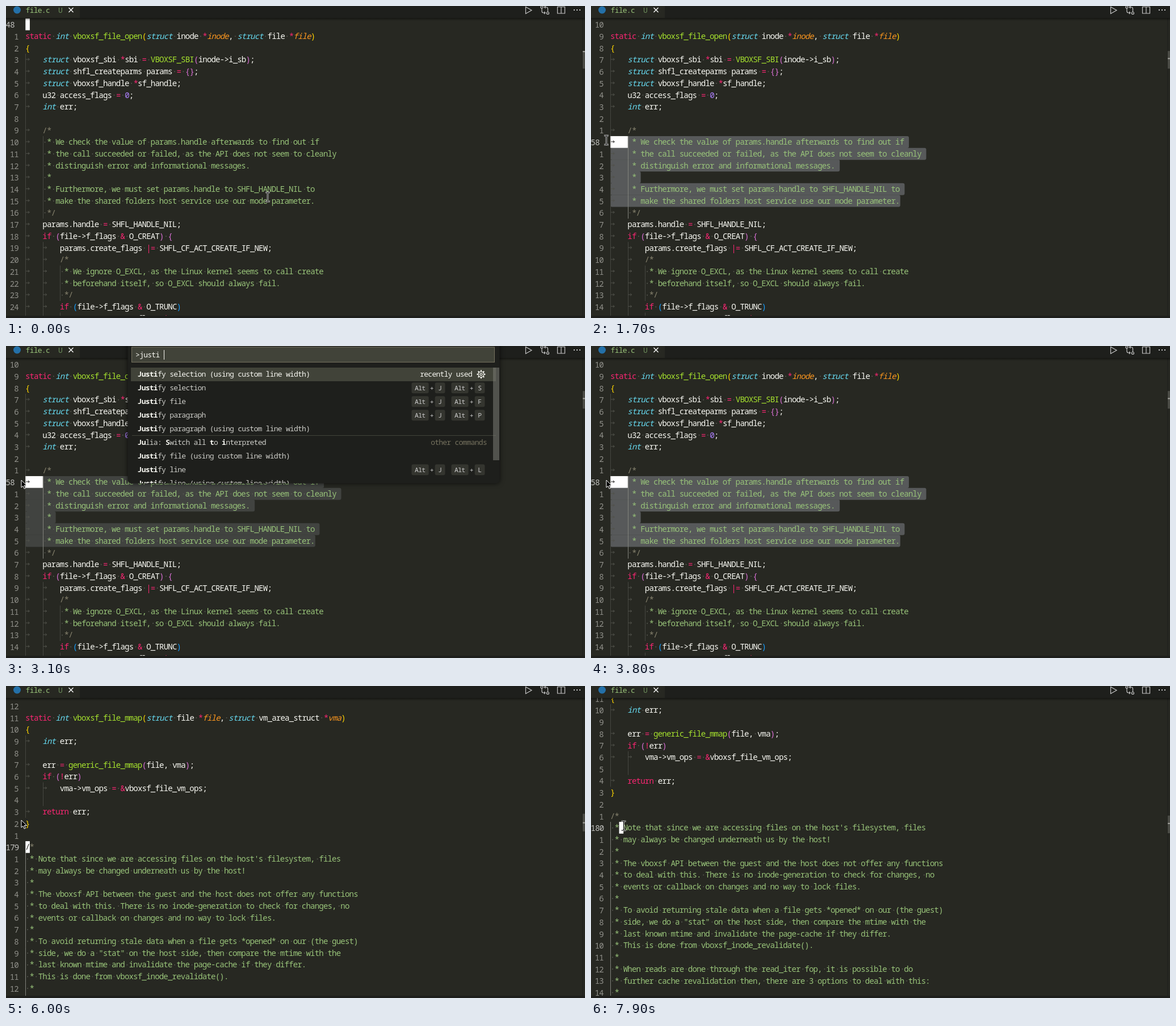
These frames come from a looping animation (1020x549 px, 8000 ms). An HTML page with a canvas:

```html
<!DOCTYPE html>
<html>
<head>
<meta charset="utf-8">
<style>
html, body { margin: 0; height: 100%; overflow: hidden; background: #272822; }
canvas { display: block; }
</style>
</head>
<body>
<canvas id="stage" width="1020" height="549"></canvas>
<script>
const ctx = document.getElementById('stage').getContext('2d');
const LOOP = 8000, LEFT = 34.3, CW = 7.62, LH = 20.7;
const FG = '#f8f8f2', BG = '#272822', DARK = '#1e1f1c', PINK = '#f92672',
  GREEN = '#98c379', GREY = '#88846f', FAINT = '#51524b';

const openDoc = `
static int vboxsf_file_open(struct inode *inode, struct file *file)
{
\tstruct vboxsf_sbi *sbi = VBOXSF_SBI(inode->i_sb);
\tstruct shfl_createparms params = {};
\tstruct vboxsf_handle *sf_handle;
\tu32 access_flags = 0;
\tint err;

\t/*
\t * We check the value of params.handle afterwards to find out if
\t * the call succeeded or failed, as the API does not seem to cleanly
\t * distinguish error and informational messages.
\t *
\t * Furthermore, we must set params.handle to SHFL_HANDLE_NIL to
\t * make the shared folders host service use our mode parameter.
\t */
\tparams.handle = SHFL_HANDLE_NIL;
\tif (file->f_flags & O_CREAT) {
\t\tparams.create_flags |= SHFL_CF_ACT_CREATE_IF_NEW;
\t\t/*
\t\t * We ignore O_EXCL, as the Linux kernel seems to call create
\t\t * beforehand itself, so O_EXCL should always fail.
\t\t */
\t\tif (file->f_flags & O_TRUNC)
\t\t\tparams.create_flags |= SHFL_CF_ACT_OVERWRITE_IF_EXISTS;`.split('\n');

const justifiedDoc = openDoc.slice();
justifiedDoc.splice(10, 6, ...`\t * We check the value of params.handle afterwards  to  find  out  if  the  call
\t * succeeded or failed, as the API does not seem to cleanly  distinguish  error
\t * and informational messages.
\t *
\t * Furthermore, we must set params.handle to SHFL_HANDLE_NIL to make the shared
\t * folders host service use our mode parameter.`.split('\n'));

const mmapDoc = `
static int vboxsf_file_mmap(struct file *file, struct vm_area_struct *vma)
{
\tint err;

\terr = generic_file_mmap(file, vma);
\tif (!err)
\t\tvma->vm_ops = &vboxsf_file_vm_ops;

\treturn err;
}

/*
 * Note that since we are accessing files on the host's filesystem, files
 * may always be changed underneath us by the host!
 *
 * The vboxsf API between the guest and the host does not offer any functions
 * to deal with this. There is no inode-generation to check for changes, no
 * events or callback on changes and no way to lock files.
 *
 * To avoid returning stale data when a file gets *opened* on our (the guest)
 * side, we do a "stat" on the host side, then compare the mtime with the
 * last known mtime and invalidate the page-cache if they differ.
 * This is done from vboxsf_inode_revalidate().
 *
 * When reads are done through the read_iter fop, it is possible to do
 * further cache revalidation then, there are 3 options to deal with this:
 *`.split('\n');

// Palette entries: [label with *bold* parts, key chords]
const recent = [
  ['Justify selection (using custom line width)'],
  ['View: Toggle Status Bar Visibility'],
  ['Justify selection', 'Alt J Alt S'],
  ['Debug: JavaScript Debug Terminal'],
  ['Git: Commit'],
  ['Reload Custom CSS and JS'],
  ['Easy Terminal: Decrease Font Size', 'Ctrl Shift -'],
  ['View: Toggle Word Wrap', 'Alt Z'],
  ['View: Toggle Breadcrumbs']];
const matches = [
  ['*Justi*fy selection (using custom line width)'],
  ['*Justi*fy selection', 'Alt J Alt S'],
  ['*Justi*fy file', 'Alt J Alt F'],
  ['*Justi*fy paragraph', 'Alt J Alt P'],
  ['*Justi*fy paragraph (using custom line width)'],
  ['*Ju*lia: *S*witch all *t*o *i*nterpreted'],
  ['*Justi*fy file (using custom line width)'],
  ['*Justi*fy line', 'Alt J Alt L'],
  ['*Justi*fy line (using custom line width)']];

// Mouse path: time, x, y
const path = [[0, 461, 336], [400, 545, 343], [900, 118, 263], [1400, 27, 236],
  [6200, 27, 236], [6800, 64, 240], [7100, 48, 238], [7200, 48, 238],
  [7300, 48, 246], [7800, 48, 246], [7900, 57.5, 246], [8000, 57.5, 246]];

const FAMILY = '"Noto Sans Mono", "DejaVu Sans Mono", monospace';
ctx.font = '100px ' + FAMILY;
const advance = ctx.measureText('M').width / 100;

// Tall, tightly tracked type on a fixed cell grid
function text(s, x, y, color, pitch = CW, style = '') {
  const size = pitch * 1.85, tracking = pitch - advance * size;
  ctx.font = `${style} ${size}px ${FAMILY}`;
  ctx.letterSpacing = tracking + 'px';
  ctx.fillStyle = color;
  ctx.fillText(s, x + tracking / 2, y + pitch * 0.66);
}
function rect(x, y, w, h, color) {
  ctx.fillStyle = color;
  ctx.fillRect(x, y, w, h);
}
function round(x, y, w, h, r, color) {
  ctx.fillStyle = color;
  ctx.beginPath();
  ctx.roundRect(x, y, w, h, r);
  ctx.fill();
}
function stroke(d, color, width = 1) {
  ctx.strokeStyle = color;
  ctx.lineWidth = width;
  ctx.stroke(new Path2D(d));
}
const colX = c => LEFT + c * CW;
const expand = s => s.replace(/\t/g, '    ');
const indent = s => expand(s).search(/\S/);

function mouseAt(t) {
  const i = path.findIndex(p => p[0] > t), [a, b] = [path[i - 1], path[i]];
  const k = (t - a[0]) / (b[0] - a[0]);
  return [a[1] + (b[1] - a[1]) * k, a[2] + (b[2] - a[2]) * k];
}

function guideCount(doc, i) {
  if (doc[i]) return Math.ceil(indent(doc[i]) / 4);
  const a = doc[i - 1] ? indent(doc[i - 1]) : 0, b = doc[i + 1] ? indent(doc[i + 1]) : 0;
  return a === b ? Math.ceil(a / 4) : 1 + Math.floor(Math.min(a, b) / 4);
}

const brackets = ['#ffd700', '#da70d6', '#179fff'];
let depth = 0;
function drawCode(line, y) {
  const full = expand(line), body = full.trimStart();
  let col = full.length - body.length;
  if (/^(\/\*|\*)/.test(body)) {
    text(body, colX(col), y, /^(\/\*|\*\/)$/.test(body) ? GREY : GREEN);
    return;
  }
  const tokens = body.match(/->|\w+|[*=&|!]+|./g) || [];
  tokens.forEach((tok, i) => {
    let color = FG, style = '';
    if (/^(struct|int)$/.test(tok)) { color = '#66d9ef'; style = 'italic'; }
    else if (/^(static|if|return|[*=&|!]+)$/.test(tok)) color = PINK;
    else if (/^\d+$/.test(tok)) color = '#ae81ff';
    else if (/[({]/.test(tok)) color = brackets[depth++ % 3];
    else if (/[)}]/.test(tok)) color = brackets[--depth % 3];
    else if (/^\w/.test(tok) && tokens[i + 1] === '(') color = '#a6e22e';
    else if (tokens[0] === 'static' && tokens[i - 1] === '*') { color = '#fd971f'; style = 'italic'; }
    text(tok, colX(col), y, color, CW, style);
    col += tok.length;
  });
}

function tabArrow(x, y, color) {
  stroke(`M${x + 1} ${y}h6m-2.5 -2l2.5 2l-2.5 2`, color);
}
function drawSpaces(line, y) {
  let col = 0;
  for (const ch of line) {
    if (ch === '\t') tabArrow(colX(col), y - 0.5, FAINT);
    if (ch === ' ') rect(colX(col) + 3, y - 0.5, 1.6, 1.6, '#5c5d56');
    col += ch === '\t' ? 4 : 1;
  }
}

function editor(t, mouse) {
  const late = t >= 6000, selecting = t >= 400 && t < 4500;
  const doc = late ? mmapDoc : t >= 4500 ? justifiedDoc : openDoc;
  const first = late ? 167 : 48;
  const scroll = late ? 54.7 * (1 - (1 - Math.min(1, (t - 6000) / 700)) ** 2) : 0;
  const top = (late ? 35 : 32.3) - scroll;
  const rowY = i => top + i * LH;

  let row = 0, col = 0;
  if (late) { row = t < 7500 ? 12 : 13; col = t < 7500 ? 0 : 2; }
  else if (t >= 4500) row = 10;
  else if (selecting) {
    row = Math.min(15, Math.max(10, Math.round((mouse[1] - top) / LH)));
    col = Math.round((mouse[0] + 15 - LEFT) / CW);
    if (col < 4) col = col < 2 ? 0 : 4;
    col = Math.min(col, expand(doc[row]).length);
  }

  ctx.save();
  ctx.beginPath();
  ctx.rect(0, 21, 1020, 524);
  ctx.clip();

  if (selecting) {
    const color = t >= 2200 && t < 3800 ? '#414340' : '#57595a';
    for (let i = row; i <= 15; i++) {
      const a = colX(i === row ? col : 0);
      const b = colX(expand(doc[i]).length + (i < 15 ? 1 : 0));
      if (b > a) round(a, rowY(i) - LH / 2, b - a, LH + 0.3, 3, color);
    }
  }

  depth = 0;
  doc.forEach((line, i) => {
    const y = rowY(i), n = Math.abs(i - row);
    for (let g = 0; g < guideCount(doc, i); g++) {
      const lit = late ? i > 12 : t >= 400 && g === 1 && i >= 10 && i <= 16;
      rect(Math.round(colX(g * 4)), y - LH / 2, 1, LH + 0.3, lit ? '#82837c' : '#464741');
    }
    drawSpaces(line, y);
    drawCode(line, y);
    if (n) text(String(n), 22.3 - String(n).length * CW, y + 0.8, '#90908a');
    else text(String(first + i), 0, y + 0.8, '#c2c2bf');
  });

  if (t >= 4500 && !late) {
    ctx.strokeStyle = '#888';
    ctx.lineWidth = 1;
    ctx.strokeRect(34.5, rowY(2) - 9.8, 7, 19.5);
  }

  const off = (t >= 5100 && t < 5500) || (t >= 6500 && t < 7000);
  if (!off) {
    const y = rowY(row), wide = selecting && col === 0;
    const c = selecting && !wide ? col + 1 : col;
    if (c !== col) rect(colX(col) - 1, y - LH / 2, 1.5, LH, '#fff');
    rect(colX(c), y - LH / 2, wide ? CW * 4 : CW, LH, '#fff');
    if (wide) tabArrow(colX(0), y - 0.5, '#222');
    else text(expand(doc[row])[c] || '', colX(c), y, BG);
  }

  // overview ruler
  const ruler = n => 21 + n * 1.225;
  rect(1015.5, 21, 1, 524, DARK);
  rect(1016, ruler(first - 0.5 + (32.3 - top) / LH), 4, 31, '#4b4c46');
  rect(1016, ruler(first + row - 0.5), 4, 2, '#a0a09a');

  const shade = ctx.createLinearGradient(0, 21, 0, 26);
  shade.addColorStop(0, 'rgba(0,0,0,.45)');
  shade.addColorStop(1, 'rgba(0,0,0,0)');
  rect(0, 21, 1020, 5, shade);
  ctx.restore();
}

function tabBar() {
  rect(130, 0, 890, 21, DARK);
  ctx.fillStyle = '#2470a8';
  ctx.beginPath();
  ctx.arc(19.5, 7, 6.5, 0, 7);
  ctx.fill();
  text('file.c', 35, 7, GREEN, 7.07);
  text('U', 92.5, 7, '#6a8a59', 7.07);
  stroke('M110.5 3l8 8m0 -8l-8 8', '#fff', 1.3);
  const icon = '#c5c5c5';
  stroke('M915.5 1.5v12l10.5 -6z', icon, 1.2);
  stroke('M971.5 1.5h13v11.5h-13zM978 1.5v11.5', icon, 1.2);
  stroke('M944 4v5q0 3 3 3h3m-2 -2l2 2l-2 2M954.5 10v-5q0 -3 -3 -3h-3m2 -2l-2 2l2 2', icon, 1.2);
  for (const [x, y] of [[944, 2], [954.5, 12.5]]) {
    ctx.beginPath();
    ctx.arc(x, y, 2, 0, 7);
    ctx.stroke();
  }
  for (const x of [1000, 1005, 1010]) rect(x, 6, 2, 2, icon);
}

function gear(x, y) {
  ctx.strokeStyle = FG;
  ctx.lineWidth = 1.2;
  for (const r of [2, 5]) {
    ctx.beginPath();
    ctx.arc(x, y, r, 0, 7);
    ctx.stroke();
  }
  for (let a = 0; a < 8; a++) {
    const c = Math.cos(a * Math.PI / 4), s = Math.sin(a * Math.PI / 4);
    stroke(`M${x + 5 * c} ${y + 5 * s}L${x + 7.5 * c} ${y + 7.5 * s}`, FG, 2);
  }
}

function keys(chord, right, y) {
  const list = chord.split(' ');
  for (let i = list.length - 1; i >= 0; i--) {
    const w = list[i].length * 6.2 + 11.6;
    right -= w;
    round(right, y - 9.5, w, 19, 3, '#34352f');
    text(list[i], right + 5.8, y, '#ccc', 6.2);
    const joined = list.length < 4 || i % 2;
    if (i && joined) text('+', right - 8.6, y, '#ccc', 6.2);
    right -= 11;
  }
}

function palette(t) {
  const typed = t >= 3100, focus = t >= 3300 ? 1 : 0;
  ctx.save();
  ctx.shadowColor = 'rgba(0,0,0,.7)';
  ctx.shadowBlur = 9;
  round(214.5, -8, 655, 249.5, 6, DARK);
  ctx.restore();

  ctx.save();
  ctx.beginPath();
  ctx.roundRect(214.5, -8, 655, 249.5, 6);
  ctx.clip();
  round(221, 1.5, 640, 27.5, 2, '#414339');
  ctx.strokeStyle = '#75715e';
  ctx.lineWidth = 1;
  ctx.strokeRect(221.5, 2, 639, 26.5);
  text(typed ? '>justi' : '>', 228.5, 15.5, FG, 7.07);
  rect(typed ? 278 : 235, 7, 1, 17, FG);

  rect(220, 38 + focus * 24, 643, 24, '#414339');
  (typed ? matches : recent).forEach(([label, chord], i) => {
    const y = 49.8 + i * 24, shift = i === focus ? 26 : 0;
    let x = 232;
    label.split('*').forEach((part, j) => {
      text(part, x, y, j % 2 || i === focus ? FG : '#ccccc7', 7.07, j % 2 ? 'bold' : '');
      x += part.length * 7.07;
    });
    if (chord) keys(chord, 843.5 - shift, y);
    if (shift) gear(837, y);
    const group = i === 0 ? 'recently used' : typed && i === 5 ? 'other commands' : '';
    text(group, 847.5 - shift - group.length * 7.07, y, shift ? FG : '#75715e', 7.07);
  });
  if (typed) {
    rect(222, 157, 641, 1, '#414339');
    rect(858, 38, 11, 163, 'rgba(125,125,118,.55)');
  }
  ctx.restore();
}

function pointer([x, y], arrow) {
  if (arrow) {
    const d = new Path2D(`M${x} ${y}v13l3 -2.7l2.2 4.9l2.2 -1l-2.2 -4.7h4.2z`);
    ctx.fillStyle = '#000';
    ctx.fill(d);
    ctx.strokeStyle = '#fff';
    ctx.lineWidth = 1;
    ctx.stroke(d);
    return;
  }
  const beam = `M${x - 4} ${y - 8}h3l1 1l1 -1h3M${x} ${y - 7}v14M${x - 4} ${y + 8}h3l1 -1l1 1h3`;
  stroke(beam, '#fff', 2.6);
  stroke(beam, '#000', 1.2);
}

function frame(now) {
  const t = Math.floor(now % LOOP / 100) * 100;
  const mouse = mouseAt(t);
  rect(0, 0, 1020, 549, BG);
  editor(t, mouse);
  rect(0, 545, 1020, 4, DARK);
  tabBar();
  if (t >= 2200 && t < 3800) palette(t);
  pointer(mouse, t >= 2200 && t < 6300);
  requestAnimationFrame(frame);
}
requestAnimationFrame(frame);
</script>
</body>
</html>
```
